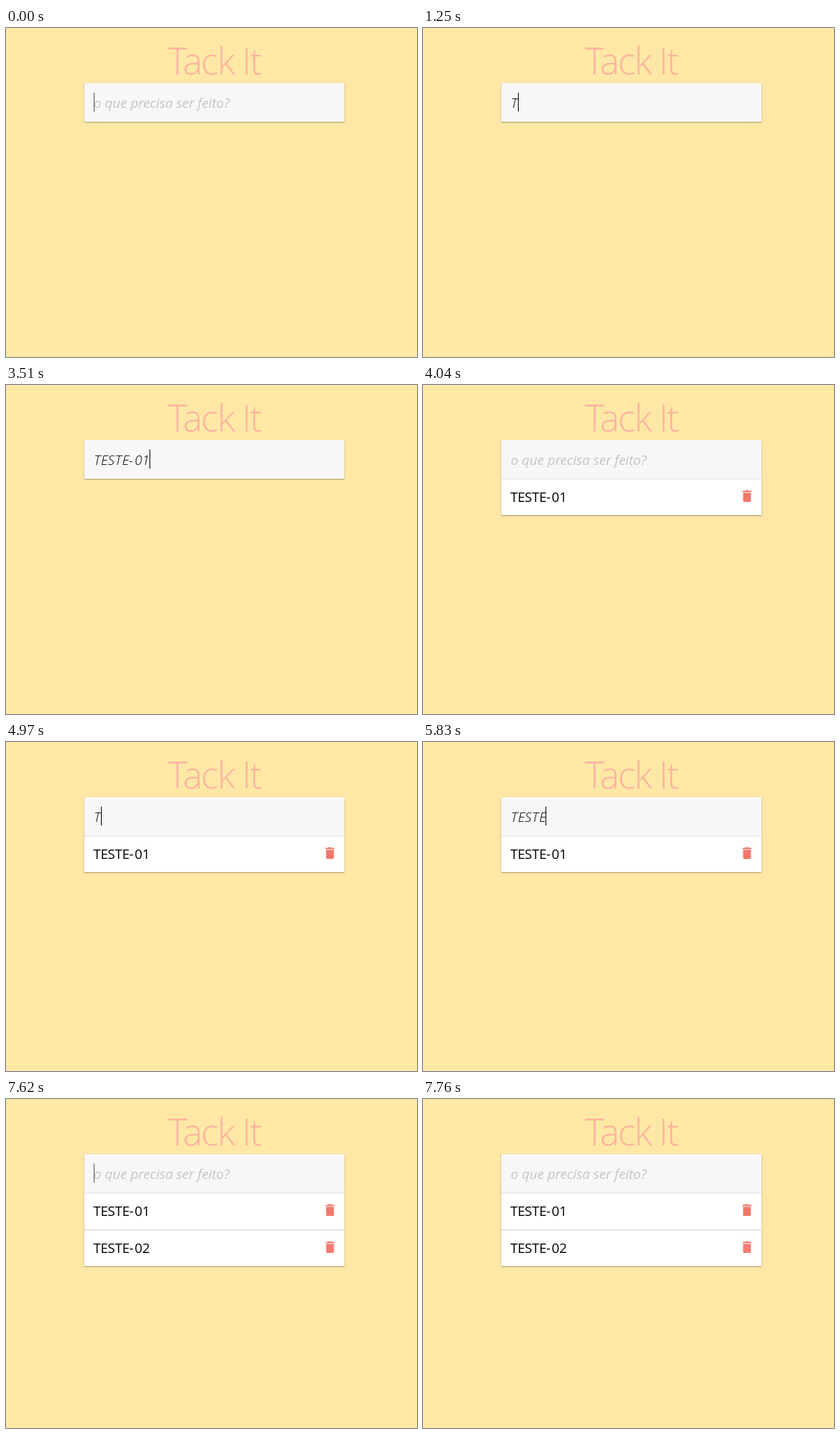
An HTML page that plays this animation: 567x453 px, repeating every 8000 ms.

```html
<!DOCTYPE html>
<html lang="pt">
<head>
<meta charset="utf-8">
<title>Tack It</title>
<style>
  html, body { margin: 0; width: 567px; height: 453px; overflow: hidden; background: #ffe8a6; }
  #card { position: absolute; left: 108px; top: 76px; width: 359px; background: #fff; box-shadow: 0 1px 2px rgba(0, 0, 0, .36); }
  #field { height: 53px; background: #f7f7f7; }
  svg { position: absolute; left: 0; top: 0; }
  text { font: 18.6px "Open Sans", "Noto Sans", sans-serif; white-space: pre; }
  #title { font-size: 51px; font-weight: 330; letter-spacing: -1.9px; fill: #ffb2a0; text-anchor: middle; }
  #hint, #typed { font-style: italic; }
  #typed { font-weight: 350; }
  #hint { fill: #c4c4c4; }
</style>
</head>
<body>
<div id="card"><div id="field"></div></div>
<svg width="567" height="453" viewBox="0 0 567 453">
  <defs>
    <path id="bin" d="M6 19c0 1.1.9 2 2 2h8c1.1 0 2-.9 2-2V7H6zM19 4h-3.5l-1-1h-5l-1 1H5v2h14z"/>
  </defs>
  <text id="title" x="287.5" y="64">Tack It</text>
  <text id="hint" x="121" y="110">o que precisa ser feito?</text>
  <text id="typed" y="110"></text>
  <rect id="caret" y="89" width="1" height="26"/>
  <g class="item">
    <rect x="108" y="129" width="359" height="1" fill="#e2e2e2"/>
    <text y="161">TESTE-01</text>
    <use href="#bin" transform="translate(436.2 142.2) scale(.9)" fill="#f0776a"/>
  </g>
  <g class="item">
    <rect x="108" y="179.5" width="359" height="1.5" fill="#dedede"/>
    <text y="212">TESTE-02</text>
    <use href="#bin" transform="translate(436.2 193.2) scale(.9)" fill="#fa7c75"/>
  </g>
</svg>
<script>
  const LOOP = 8000;
  // Pen offsets per character; the caret shares the italic ones.
  const italic = [0, 9.6, 19.2, 29, 39, 48, 56.2, 66.5, 77];
  const upright = [0, 10, 19.7, 29.8, 39.8, 49.4, 57.1, 67.4];
  // [time, typed text, caret shown, items listed]
  const steps = [
    [0, '', 1, 0], [450, '', 0, 0], [980, '', 1, 0],
    [1250, 'T', 1, 0], [1380, 'TE', 1, 0], [1640, 'TES', 1, 0],
    [1910, 'TEST', 1, 0], [2040, 'TESTE', 1, 0], [2370, 'TESTE-', 1, 0],
    [2840, 'TESTE-0', 1, 0], [3370, 'TESTE-0', 0, 0], [3510, 'TESTE-01', 1, 0],
    [4040, '', 0, 1], [4570, '', 1, 1],
    [4970, 'T', 1, 1], [5030, 'TE', 1, 1], [5300, 'TES', 1, 1],
    [5640, 'TEST', 1, 1], [5830, 'TESTE', 1, 1], [6230, 'TESTE-', 1, 1],
    [6760, 'TESTE-', 0, 1], [6890, 'TESTE-0', 1, 1], [7220, 'TESTE-02', 1, 1],
    [7620, '', 1, 2], [7760, '', 0, 2]
  ];
  const cardHeights = [53, 103, 154];

  const byId = id => document.getElementById(id);
  const [card, hint, typed, caret] = ['card', 'hint', 'typed', 'caret'].map(byId);
  const items = [...document.querySelectorAll('.item')];
  const place = (node, offsets, left) =>
    node.setAttribute('x', offsets.slice(0, 8).map(x => x + left).join(' '));
  const show = (node, on) => { node.style.display = on ? '' : 'none'; };

  place(typed, italic, 121.3);
  items.forEach(item => place(item.querySelector('text'), upright, 120.5));

  let current;
  function draw(now) {
    const time = now % LOOP;
    const step = steps.findLast(s => s[0] <= time);
    if (step !== current) {
      current = step;
      const [, text, blink, count] = step;
      typed.textContent = text;
      show(hint, !text);
      show(caret, blink);
      caret.setAttribute('x', 121 + Math.round(italic[text.length]));
      caret.setAttribute('fill', text ? '#000' : '#555');
      card.style.height = cardHeights[count] + 'px';
      items.forEach((item, i) => show(item, i < count));
    }
  }

  const start = performance.now();
  function tick() {
    draw(performance.now() - start);
    requestAnimationFrame(tick);
  }
  tick();
</script>
</body>
</html>
```
